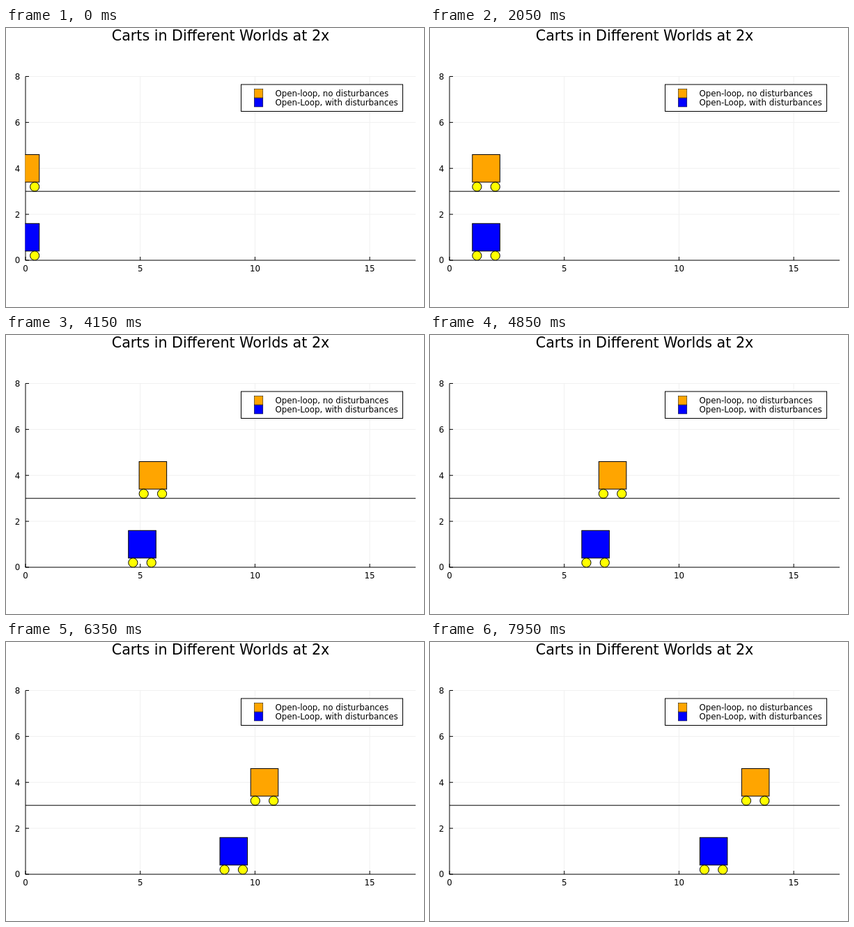
These frames come from a looping animation (600 px wide and 400 px high, 8 s). An HTML page:

```html
<!DOCTYPE html>
<html lang="en">
<head>
<meta charset="utf-8">
<title>Carts</title>
<style>
  html, body { margin: 0; width: 100%; height: 100%; overflow: hidden; background: #fff; }
  svg { display: block; width: 600px; height: 400px; }
  text { font: 11.8px "DejaVu Sans", sans-serif; fill: #000; }
  .title { font-size: 20.65px; }
</style>
</head>
<body>
<svg id="stage" viewBox="0 0 600 400">
  <clipPath id="plot"><rect x="27.5" y="69.5" width="560.5" height="264"/></clipPath>
</svg>
<script>
const STEP = 50, LOOP = 8000, UNIT = 560 / 17;
const GOAL = 15, STEPS = 200;
const px = x => 28 + UNIT * x;
const py = y => 333 - UNIT * y;

const svg = document.getElementById('stage');
function add(parent, tag, attrs, text) {
  const el = document.createElementNS(svg.namespaceURI, tag);
  for (const name in attrs) el.setAttribute(name, attrs[name]);
  if (text) el.textContent = text;
  return parent.appendChild(el);
}
const line = (parent, x1, y1, x2, y2, stroke = '#000') =>
  add(parent, 'line', { x1, y1, x2, y2, stroke });
const label = (x, y, text, anchor) =>
  add(svg, 'text', { x, y, 'text-anchor': anchor }, text);

// Grid, ticks and axes
const plotRight = px(17), plotTop = py(8);
for (const x of [5, 10, 15]) line(svg, px(x), 333, px(x), plotTop, '#f0f0f0');
for (const y of [2, 4, 6, 8]) line(svg, 28, py(y), plotRight, py(y), '#f0f0f0');
line(svg, 27.5, 333, plotRight, 333);
line(svg, 28, 333, 28, plotTop);
for (const x of [0, 5, 10, 15]) {
  line(svg, px(x), 333, px(x), 328);
  label(px(x), 349.2, String(x), 'middle');
}
for (const y of [0, 2, 4, 6, 8]) {
  line(svg, 28, py(y), 33, py(y));
  label(20.2, py(y) + 4.4, String(y), 'end');
}
label(308, 18, 'Carts in Different Worlds at 2x', 'middle').setAttribute('class', 'title');

// Carts
const scene = add(svg, 'g', { 'clip-path': 'url(#plot)' });
function makeCart(base, fill) {
  const g = add(scene, 'g', {});
  add(g, 'rect', {
    x: -0.6 * UNIT, y: py(base + 1.6), width: 1.2 * UNIT, height: 1.2 * UNIT,
    fill, stroke: '#000'
  });
  for (const x of [-0.4, 0.4]) {
    add(g, 'circle', {
      cx: x * UNIT, cy: py(base + 0.2), r: 0.2 * UNIT, fill: '#ff0', stroke: '#000'
    });
  }
  return g;
}
const ideal = makeCart(3, '#ffa500');
const disturbed = makeCart(0, '#00f');
line(scene, 28, py(3), plotRight, py(3));

// Legend
add(svg, 'rect', { x: 337.5, y: 81, width: 232, height: 38.5, fill: '#fff', stroke: '#000' });
[['#ffa500', 'Open-loop, no disturbances'], ['#00f', 'Open-Loop, with disturbances']]
  .forEach(([fill, text], i) => {
    add(svg, 'rect', {
      x: 356.3, y: 87.5 + 13 * i, width: 12.5, height: 12.5,
      fill, stroke: '#000', 'stroke-width': 0.5
    });
    label(386.4, 98.2 + 13 * i, text, 'start');
  });

// Lag of the disturbed cart: [step, distance]
const LAG = [[0, 0], [40, 0], [51, 0.02], [62, 0.094], [68, 0.19], [82, 0.466],
             [109, 1], [143, 1.682], [153, 1.81], [158, 1.822]];
function lag(k) {
  const i = Math.max(1, LAG.findIndex(p => p[0] >= k));
  const [k0, d0] = LAG[i - 1], [k1, d1] = LAG[i];
  return d0 + (d1 - d0) * (k - k0) / (k1 - k0);
}

// Minimum-effort path from rest to rest
function travel(k) {
  const u = (k + 0.5) / STEPS;
  return GOAL * u * u * (3 - 2 * u);
}

const place = (cart, x) => cart.setAttribute('transform', `translate(${px(x).toFixed(2)} 0)`);
function render(ms) {
  const k = Math.max(0, Math.floor(ms / STEP) - 1);
  place(ideal, travel(k));
  place(disturbed, travel(k) - lag(k));
}

const start = performance.now();
function tick() {
  render((performance.now() - start) % LOOP);
  requestAnimationFrame(tick);
}
tick();
</script>
</body>
</html>
```
